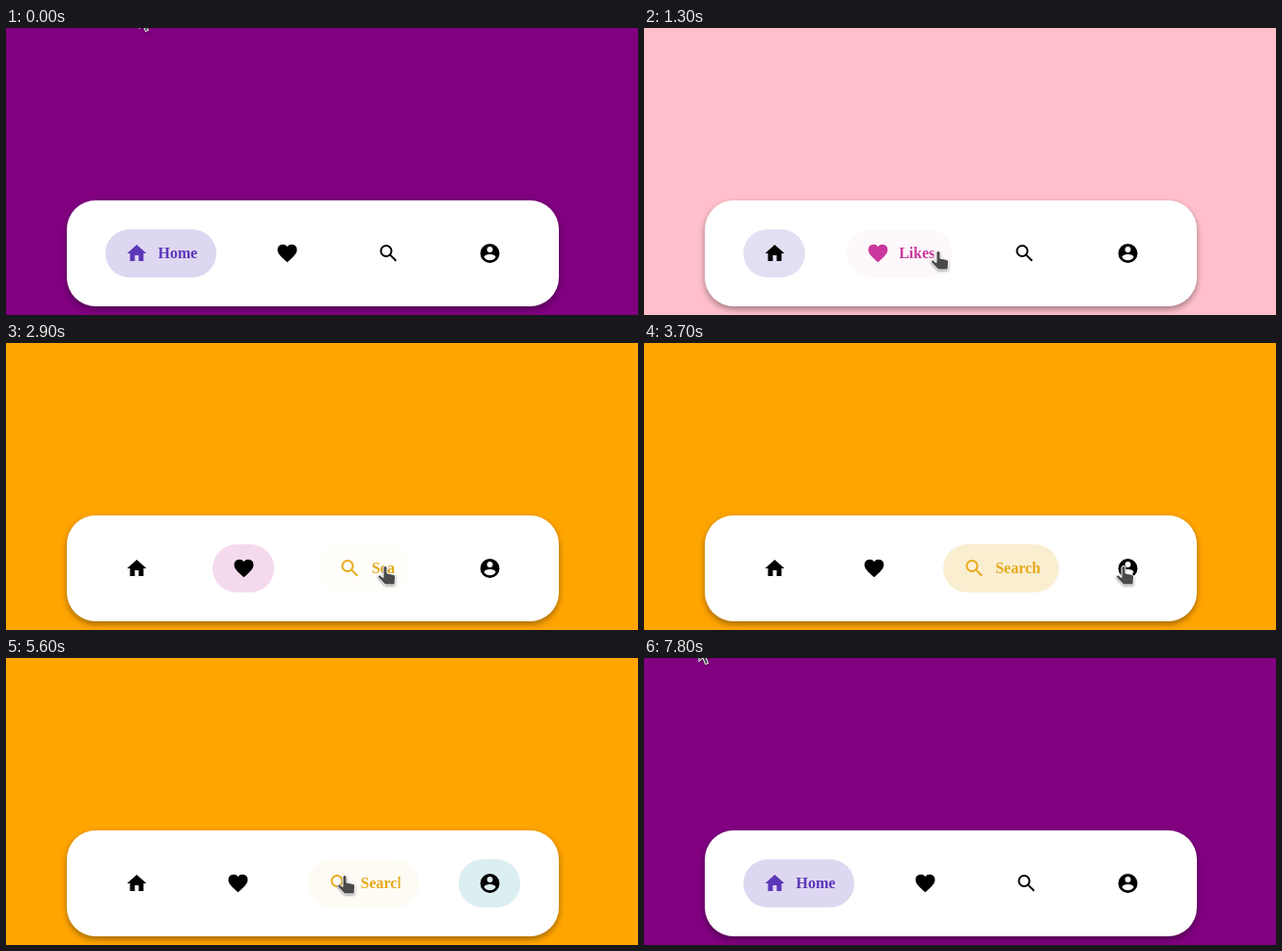
Recreate the animation shown at these times as an HTML page. Size 655x298 px, loop 8000 ms.

```html
<!DOCTYPE html>
<html lang="en">
<head>
<meta charset="utf-8">
<title>Tab bar</title>
<style>
  html, body { margin: 0; width: 100%; height: 100%; overflow: hidden; }
  body { position: relative; font: bold 16px "Liberation Serif", serif; }
  nav {
    position: absolute; left: 63px; top: 179px; width: 510px; height: 110px;
    box-sizing: border-box; padding: 0 40px; border-radius: 30px;
    display: flex; align-items: center; justify-content: space-between;
    background: #fff;
    box-shadow: 0 3px 6px rgba(0, 0, 0, .16), 0 3px 6px rgba(0, 0, 0, .23);
  }
  a {
    display: flex; align-items: center; flex: none;
    box-sizing: border-box; height: 50px; padding: 0 20px; border-radius: 25px;
  }
  a svg, a span { transform: translateX(.5px); }
  a svg { flex: none; width: 24px; height: 24px; fill: currentColor; }
  a span { min-width: 0; margin-left: 10px; overflow: hidden; white-space: nowrap; }
  .line { fill: none; stroke: currentColor; stroke-width: 2; }
  #cursor {
    position: absolute; left: 0; top: 0; width: 1px; height: 1px;
    overflow: visible; pointer-events: none;
    fill: #4a4a4a; stroke: #fff; stroke-linejoin: round;
    filter: drop-shadow(0 1px 1px rgba(0, 0, 0, .4));
  }
</style>
</head>
<body>
<nav></nav>
<svg id="cursor"><path/></svg>
<script>
const LOOP = 8000, TICK = 100;
const CLOSED = 64, OPEN = 120, GROW = 100, FADE = 400, TINT = 0.2;

const tabs = [
  { name: 'Home', color: '#5b37b7', page: 'purple',
    icon: '<path d="M10 20v-6h4v6h5v-8h3L12 3 2 12h3v8z"/>' },
  { name: 'Likes', color: '#c9379d', page: 'pink',
    icon: '<path d="M12 21.35C5.4 15.4 2 12.3 2 8.5A5.5 5.5 0 0 1 12 5.1 5.5 5.5 0 0 1 22 8.5C22 12.3 18.6 15.4 12 21.35z"/>' },
  { name: 'Search', color: '#e6a919', page: 'orange',
    icon: '<g class="line"><circle cx="9.5" cy="9.5" r="5.5"/><path d="M13.4 13.4l6.35 6.35"/></g>' },
  { name: 'Profile', color: '#1892a6', page: 'teal',
    icon: '<path d="M12 2a10 10 0 1 0 0 20 10 10 0 0 0 0-20zm0 3a3 3 0 1 1 0 6 3 3 0 0 1 0-6zm0 14.2q-3.8 0-6-3.2c0-4.1 12-4.1 12 0q-2.2 3.2-6 3.2z"/>' }
];

// The pointer travels for `took` ms, arrives at (x, y) and clicks a tab.
const stops = [
  { arrive: 0, x: 138, y: -15.5, click: -LOOP, tab: 0 },
  { arrive: 800, took: 800, x: 305, y: 232, click: 1242, tab: 1 },
  { arrive: 2200, took: 450, x: 393, y: 232, click: 2863, tab: 2 },
  { arrive: 3700, took: 450, x: 497, y: 232, click: 4250, tab: 3 },
  { arrive: 4900, took: 450, x: 351, y: 226, click: 5530, tab: 2 },
  { arrive: 6100, took: 450, x: 136, y: 226, click: 6546, tab: 0 },
  { arrive: 7800, took: 800, x: 57, y: -12.5, bow: 38 }
];

const ARROW = 'M0 0V16L4 12.5 6.5 19 9.5 18 7 11.5H12Z';
const HAND = 'M-2 1.5Q-2-.5 0-.5T2 1.5V7L9 8.5Q11 9 10.5 11.5L10 19H0L-7.5 11Q-8 9-5.5 9L-2 11.5Z';

const nav = document.querySelector('nav');
const cursor = document.getElementById('cursor');
const shape = cursor.firstElementChild;

nav.innerHTML = tabs.map(t =>
  `<a><svg viewBox="0 0 24 24">${t.icon}</svg><span>${t.name}</span></a>`).join('');
const links = [...nav.children];

const unit = v => Math.min(1, Math.max(0, v));
const easeOut = x => 1 - (1 - x) ** 2;
const smooth = x => x * x * (3 - 2 * x);

// The CSS "ease" curve, solved by bisection
function ease(x) {
  const curve = (s, a, b) => 3 * a * s * (1 - s) ** 2 + 3 * b * s * s * (1 - s) + s ** 3;
  let lo = 0, hi = 1;
  for (let i = 0; i < 20; i++) {
    const mid = (lo + hi) / 2;
    if (curve(mid, .25, .25) < x) lo = mid; else hi = mid;
  }
  return curve(lo, .1, 1);
}

function drawTabs(t) {
  const n = stops.findLastIndex(s => s.click <= t);
  const active = stops[n].tab, previous = stops[n - 1]?.tab;
  const age = t - stops[n].click;
  const fade = ease(unit(age / FADE));
  const width = CLOSED + (OPEN - CLOSED) * easeOut(unit(age / GROW));

  document.body.style.background = tabs[active].page;
  links.forEach((link, i) => {
    const on = i === active;
    const alpha = TINT * (on ? fade : i === previous ? 1 - fade : 0);
    const hex = Math.round(alpha * 255).toString(16).padStart(2, '0');
    link.style.maxWidth = (on ? width : CLOSED) + 'px';
    link.style.color = on ? tabs[i].color : '#000';
    link.style.background = tabs[i].color + hex;
  });
}

function drawCursor(t) {
  const n = Math.max(1, stops.findLastIndex(s => s.arrive - s.took <= t));
  const from = stops[n - 1], to = stops[n];
  const k = smooth(unit(1 + (t - to.arrive) / to.took));
  const x = from.x + (to.x - from.x) * k + (to.bow || 0) * Math.sin(Math.PI * k);
  const y = from.y + (to.y - from.y) * k;
  const over = document.elementFromPoint(x, y);
  shape.setAttribute('d', over && over.closest('a') ? HAND : ARROW);
  cursor.style.transform = `translate(${x}px, ${y}px)`;
}

const begin = performance.now();
function frame() {
  const t = Math.floor((performance.now() - begin) % LOOP / TICK) * TICK;
  drawTabs(t);
  drawCursor(t);
  requestAnimationFrame(frame);
}
frame();
</script>
</body>
</html>
```
